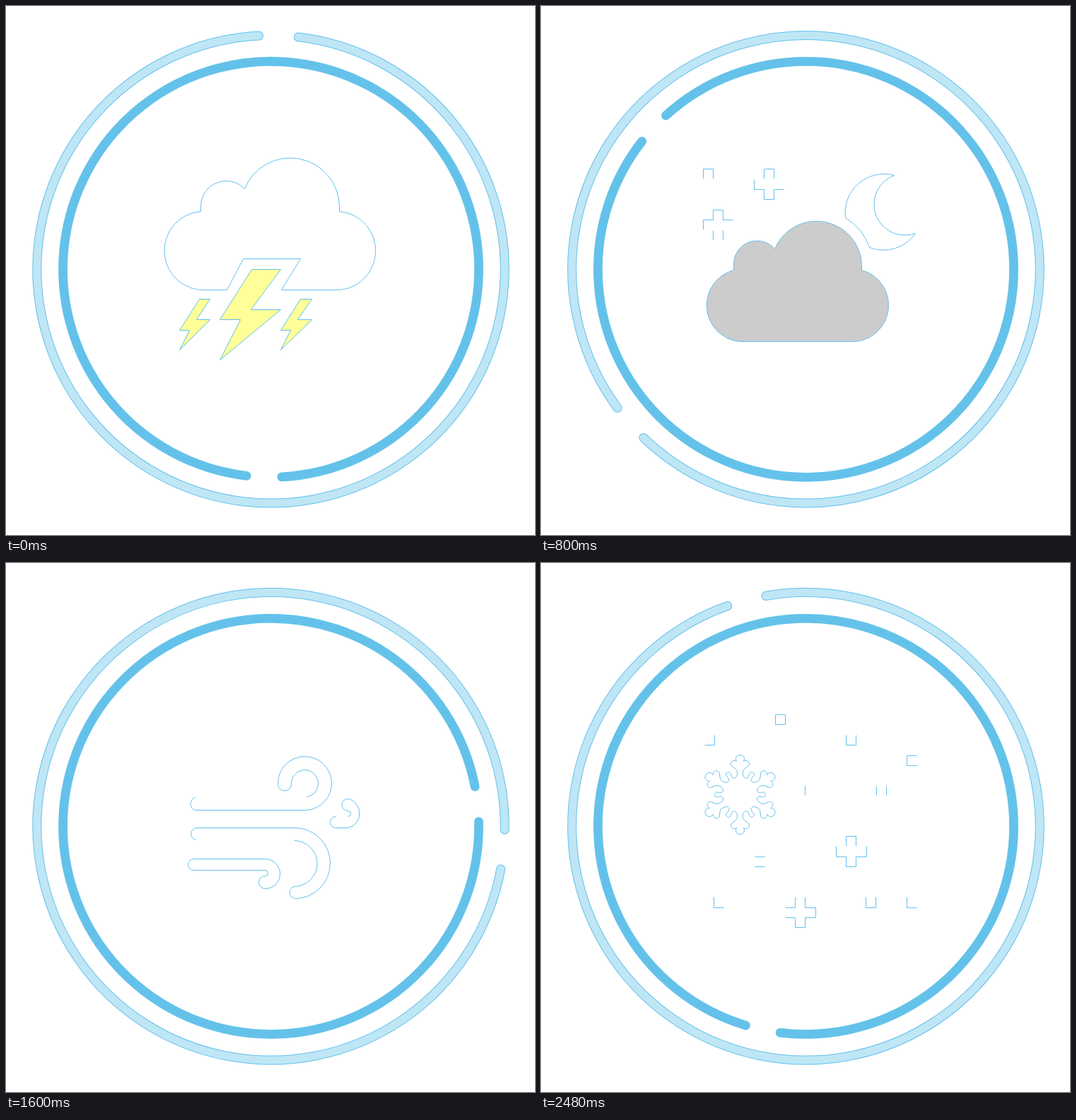
These frames come from a looping animation (748 by 748 pixels, 2560 ms). An HTML page with a canvas:

```html
<!DOCTYPE html>
<html lang="en">
<head>
<meta charset="utf-8">
<title>Weather loader</title>
<style>
  html, body { margin: 0; height: 100%; overflow: hidden; background: #fff; }
  canvas { display: block; }
</style>
</head>
<body>
<canvas id="stage" width="748" height="748"></canvas>
<script>
const ctx = document.getElementById('stage').getContext('2d');
const STEP = 80, STEPS = 32, STEPS_PER_ICON = 4;
const EDGE = '#62c0ec', DEEP = '#64c2ea', PALE = '#bfe6f5';
const HALF_GAP = 4.85;

const shape = (d, fill) => ({ path: new Path2D(d), fill });

const storm = [
  shape(`M312 401H283A55.5 55.5 0 0 1 275 290V283A36 36 0 0 1 337 258
    A69.5 69.5 0 0 1 471 283V290A55.5 55.5 0 0 1 462 401H389L416 357H335Z`),
  shape('M347 372H388L346 429H388L302 500L331 443H302Z', '#ff9'),
  shape('M273 414H288L269 443H288L245 486L259 458H245Z', '#ff9'),
  shape('M416 414H432L412 443H432L388 486L402 458H388Z', '#ff9'),
];

const wind = [
  shape(`M267 331A9.5 9.5 0 0 0 267 349H425A38 38 0 1 0 384 312
    A9.5 9.5 0 0 0 403 312A19 19 0 1 1 425 330`),
  shape(`M268 391A8.7 8.7 0 0 1 268 374H408A50 50 0 0 1 408 474
    A8.7 8.7 0 0 1 407 457A32.5 32.5 0 0 0 407 392`),
  shape(`M265 418H366A21 21 0 0 1 366 460A9 9 0 0 1 366 442
    A4 4 0 0 0 366 434H265A8 8 0 0 1 265 418`),
  shape(`M466 358A8 8 0 0 0 466 374H483A21 21 0 0 0 483 333
    A8.5 8.5 0 0 0 483 350A4 4 0 0 1 483 358`),
];

const night = [
  shape(`M280 474A51.5 51.5 0 0 1 272 373V366A33 33 0 0 1 330 343
    A64 64 0 0 1 453 366V373A51.5 51.5 0 0 1 444 474Z`, '#ccc'),
  shape(`M430 299A55 55 0 0 1 499 239A43.5 43.5 0 0 0 529 321
    A55 55 0 0 1 464 341A79 79 0 0 0 430 299`),
  shape(`M229 244V230H243V244M315 244V230H329V244
    M301 245V259H315V273H329V259H343
    M229 316V302H243V288H257V302H271M243 317V330M257 317V330`),
];

function snowflake(x, y) {
  const half = new Path2D(`M0-56C6-56 7-51 5-47C11-51 16-43 11-40L6-36
    C4-34 4-33 4-30C4-22 11-22 12-26C13-31 15-33 18-31`);
  const path = new Path2D();
  for (let arm = 0; arm < 6; arm++) {
    for (const side of [1, -1]) {
      path.addPath(half, new DOMMatrix().translate(x, y).rotate(arm * 60).scale(side, 1));
    }
  }
  return { path };
}

const snow = [
  snowflake(281, 327),
  shape(`M331 214H345V228H331ZM231 257H245V243M431 243V257H445V243
    M531 272H517V286H531M373 315V328M474 315V328M488 315V328
    M417 400V415H431V429H445V415H460V400M431 400V386H445V400
    M302 415H316M302 429H316M244 472V487H258
    M345 501H359V515H373V501H388V487H373V472M359 472V487H345
    M459 472V487H473V472M517 472V487H531`),
];

const icons = [storm, wind, night, snow];

// gapAngle is clockwise from the top, in degrees
function ring(radius, gapAngle, width, color) {
  const rad = deg => (deg - 90) * Math.PI / 180;
  ctx.beginPath();
  ctx.arc(374.5, 372.3, radius, rad(gapAngle + HALF_GAP), rad(gapAngle + 360 - HALF_GAP));
  ctx.lineWidth = width;
  ctx.strokeStyle = color;
  ctx.stroke();
}

function drawIcon(parts) {
  ctx.save();
  ctx.translate(0.5, 0.5);
  ctx.lineWidth = 1;
  ctx.strokeStyle = EDGE;
  for (const { path, fill } of parts) {
    if (fill) {
      ctx.fillStyle = fill;
      ctx.fill(path);
    }
    ctx.stroke(path);
  }
  ctx.restore();
}

function draw() {
  const step = Math.floor(performance.now() / STEP) % STEPS;
  const outer = 1.9 + 22.69 * step;
  const inner = 181.85 - 22.9 * step;
  ctx.clearRect(0, 0, 748, 748);
  ctx.lineCap = 'round';
  ring(330.7, outer, 13, EDGE);
  ring(330.7, outer, 11, PALE);
  ring(294, inner, 12.8, DEEP);
  ctx.lineCap = 'butt';
  drawIcon(icons[Math.floor(step / STEPS_PER_ICON) % icons.length]);
  requestAnimationFrame(draw);
}
draw();
</script>
</body>
</html>
```
